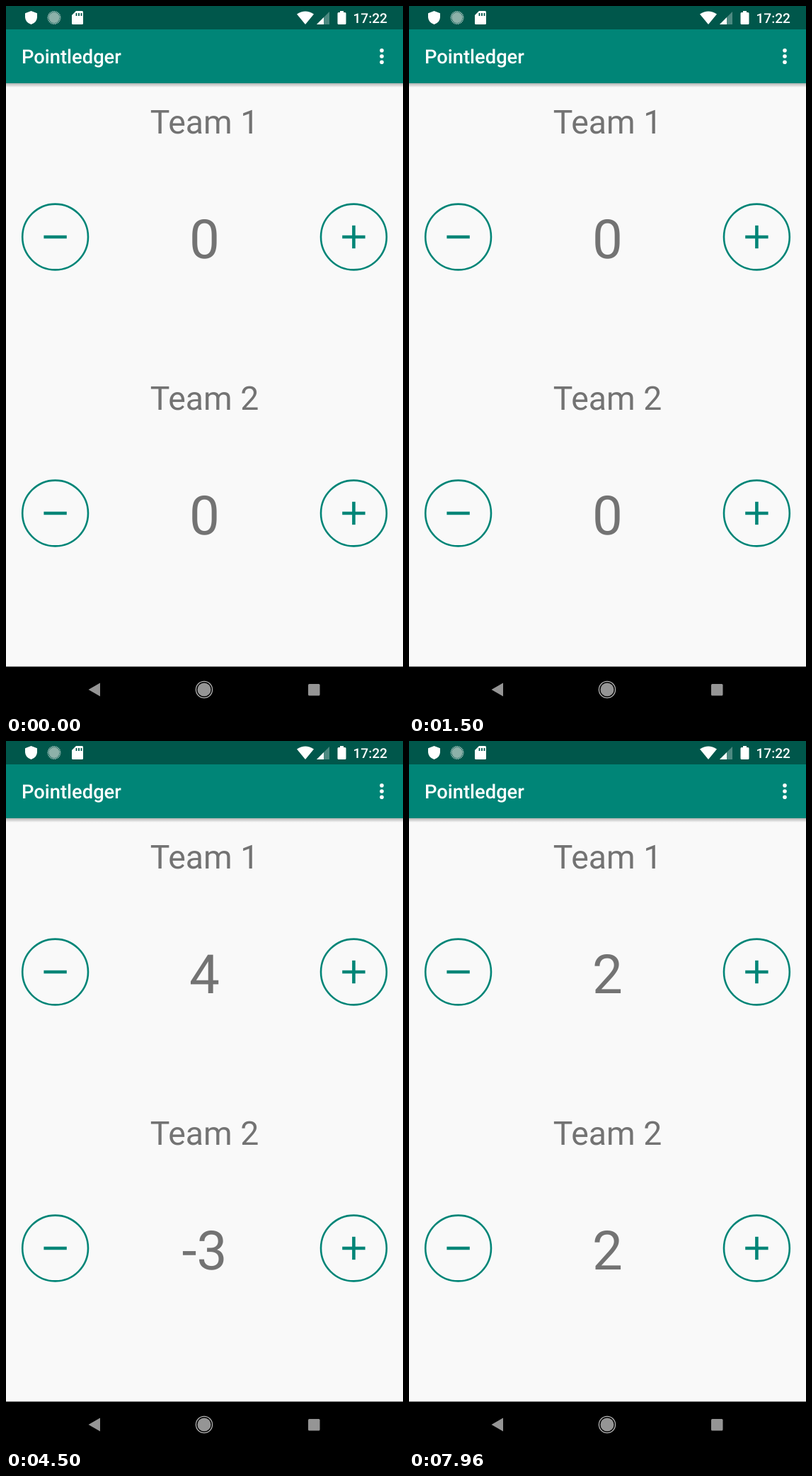
An HTML page for the animation above (8000 ms loop, 561 by 998 pixels).

```html
<!DOCTYPE html>
<html lang="en">
<head>
<meta charset="utf-8">
<title>Pointledger</title>
<style>
  html, body { margin: 0; width: 100%; height: 100%; overflow: hidden; background: #f9f9f9; }
  svg { display: block; width: 561px; height: 998px; font-family: Roboto, sans-serif; text-rendering: geometricPrecision; }
  .label, .score { fill: #737373; text-anchor: middle; }
  .label { font-size: 46.4px; }
  .score { font-size: 76.4px; }
  .button { fill: none; stroke: #008577; }
</style>
</head>
<body>
<svg viewBox="0 0 561 998">
  <defs>
    <linearGradient id="shadow" x2="0" y2="1">
      <stop stop-color="#000" stop-opacity=".28"/>
      <stop offset="1" stop-color="#000" stop-opacity="0"/>
    </linearGradient>
    <g id="minus" class="button">
      <circle r="46.4" stroke-width="2.6"/>
      <path d="M-16.2 0H16.2" stroke-width="4.6"/>
    </g>
    <g id="plus" class="button">
      <use href="#minus"/>
      <path d="M0-16.2V16.2" stroke-width="4.6"/>
    </g>
    <g id="buttons">
      <use href="#minus" x="69.6" y="326"/>
      <use href="#plus" x="491.4" y="326"/>
    </g>
  </defs>

  <rect width="561" height="998" fill="#f9f9f9"/>
  <rect y="109" width="561" height="6" fill="url(#shadow)"/>
  <rect width="561" height="109" fill="#008577"/>
  <rect width="561" height="33" fill="#00574b"/>

  <!-- status bar -->
  <g fill="#fff">
    <path d="M35.5 7 44 10.3V16Q43.5 23.5 35.5 26Q27.5 23.5 27 16V10.3Z"/>
    <circle cx="68" cy="16.5" r="7.5" fill="#8db1a9"/>
    <circle cx="68" cy="16.5" r="8.5" fill="none" stroke="#b5cdc8" stroke-width="2" stroke-dasharray="1.2 1"/>
    <path d="M99 7H107.5Q109 7 109 8.5V24.5Q109 26 107.5 26H94.5Q93 26 93 24.5V13Z"/>
    <path d="M99.5 10V14M103 10V14M106.5 10V14" stroke="#00574b" stroke-width="1.8"/>
    <path d="M411 11.5Q423 3.5 435 11.5L423 26Z"/>
    <path d="M457 8V26H439Z" opacity=".3"/>
    <path d="M449 16V26H439Z"/>
    <path d="M472 7H477V9H479Q480.5 9 480.5 10.5V24.5Q480.5 26 479 26H470Q468.5 26 468.5 24.5V10.5Q468.5 9 470 9H472Z"/>
    <text x="490.5" y="24" font-size="19.1" font-weight="500">17:22</text>
  </g>

  <!-- app bar -->
  <g fill="#fff">
    <text x="22" y="81.3" font-size="27.3" font-weight="500">Pointledger</text>
    <circle cx="531" cy="62.7" r="2.8"/>
    <circle cx="531" cy="71" r="2.8"/>
    <circle cx="531" cy="79.3" r="2.8"/>
  </g>

  <use href="#buttons"/>
  <text class="label" x="280.5" y="180">Team 1</text>
  <text class="score" x="280.5" y="356">0</text>
  <use href="#buttons" y="390"/>
  <text class="label" x="280.5" y="570">Team 2</text>
  <text class="score" x="280.5" y="746">0</text>

  <!-- navigation bar -->
  <rect y="932.5" width="561" height="65.5" fill="#000"/>
  <g fill="#959595">
    <path d="M116.5 965 133 955.5V974.5Z"/>
    <circle cx="280" cy="965" r="9.5"/>
    <circle cx="280" cy="965" r="11.6" fill="none" stroke="#b5b5b5" stroke-width="1.3"/>
    <rect x="427" y="957" width="16.5" height="16.5" rx="1.5"/>
  </g>
</svg>
<script>
  const LOOP = 8000;
  // Each team's taps: [time in ms, points added]
  const taps = [
    [[1920, 1], [2290, 1], [2670, 1], [3090, 1], [7170, -1], [7460, -1]],
    [[3670, -1], [4000, -1], [4340, -1], [5000, 1], [5370, 1], [5800, 1], [6130, 1], [6460, 1]]
  ];
  const scores = document.querySelectorAll('.score');

  const scoreAt = (list, time) =>
    list.reduce((sum, [at, points]) => sum + (time >= at ? points : 0), 0);

  function draw(now) {
    const time = now % LOOP;
    taps.forEach((list, team) => {
      scores[team].textContent = scoreAt(list, time);
    });
    requestAnimationFrame(draw);
  }
  requestAnimationFrame(draw);
</script>
</body>
</html>
```
